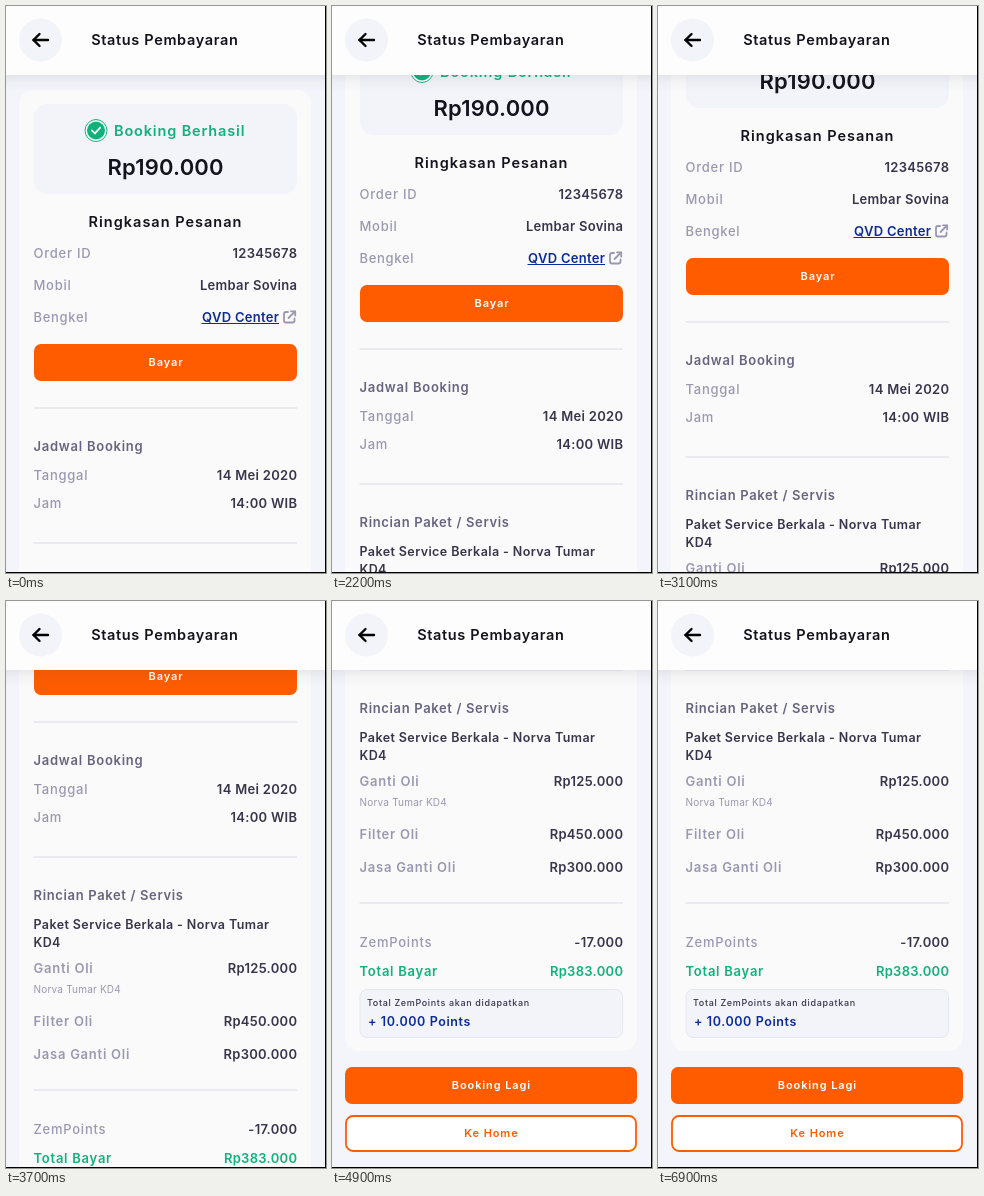
Animation, 320 px wide and 567 px high, one loop 7000 ms. Source, as an HTML page with a canvas:

```html
<!DOCTYPE html>
<html lang="id">
<head>
<meta charset="utf-8">
<title>Status Pembayaran</title>
<style>
html, body { margin: 0; width: 100%; height: 100%; overflow: hidden; background: #f4f4fb; }
canvas { display: block; width: 320px; height: 567px; }
</style>
</head>
<body>
<canvas id="stage"></canvas>
<script>
const W = 320, H = 567, LOOP = 7000, STEP = 100;
const canvas = document.getElementById('stage');
const ctx = canvas.getContext('2d');
const dpr = window.devicePixelRatio || 1;
canvas.width = W * dpr;
canvas.height = H * dpr;

const C = {
  page: '#f4f4fb', card: '#fafafa', panel: '#f3f3fa', line: '#e6e6ec',
  label: '#9a98b0', head: '#67647f', dark: '#38354b', ink: '#14131d',
  green: '#10b27c', orange: '#ff5c00', blue: '#0c2b98', white: '#ffffff'
};

const clamp = v => Math.min(1, Math.max(0, v));
const easeOut = u => 1 - (1 - u) * (1 - u);
const easeInOut = u => u * u * (3 - 2 * u);

// A short drag, then a long one to the end of the page
function scrollAt(t) {
  return Math.round(86 * easeOut(clamp((t - 1800) / 910)) +
                    382 * easeInOut(clamp((t - 3200) / 986)));
}

function box(x, y, w, h, r, fill, stroke, lw = 1) {
  ctx.beginPath();
  ctx.roundRect(x, y, w, h, r);
  if (fill) { ctx.fillStyle = fill; ctx.fill(); }
  if (stroke) { ctx.strokeStyle = stroke; ctx.lineWidth = lw; ctx.stroke(); }
}

function disc(x, y, r, fill, stroke, lw = 1) {
  box(x - r, y - r, 2 * r, 2 * r, r, fill, stroke, lw);
}

function path(points, color, lw) {
  ctx.beginPath();
  points.forEach(([x, y], i) => i ? ctx.lineTo(x, y) : ctx.moveTo(x, y));
  ctx.strokeStyle = color;
  ctx.lineWidth = lw;
  ctx.lineCap = ctx.lineJoin = 'round';
  ctx.stroke();
}

// y is the middle of the capitals
function text(str, x, y, color, { size = 13, weight = 600, gap = 0.4, align = 'left' } = {}) {
  ctx.font = `${weight} ${size}px Inter, "Open Sans", sans-serif`;
  ctx.letterSpacing = gap + 'px';
  ctx.textAlign = align;
  ctx.fillStyle = color;
  const shift = { left: 0, center: gap / 2, right: gap }[align];
  ctx.fillText(str, x + shift, y + size * 0.36);
}

function row(label, value, y, color = C.label, valueColor = C.dark, weight = 500) {
  text(label, 27.5, y, color, { weight, gap: 0.75 });
  text(value, 291, y, valueColor, { align: 'right', gap: 0.3 });
}

function rule(y) {
  ctx.fillStyle = C.line;
  ctx.fillRect(27.5, y - 0.75, 263.5, 1.5);
}

function button(str, x, y, w, outlined) {
  if (outlined) box(x + 1, y + 1, w - 2, 35, 7, C.white, C.orange, 1.8);
  else box(x, y, w, 37, 7, C.orange);
  text(str, x + w / 2, y + 18.5, outlined ? C.orange : C.white,
       { size: 11, gap: 0.9, align: 'center' });
}

function checkBadge(x, y) {
  disc(x, y, 11, C.white, C.green, 1);
  disc(x, y, 9, C.green);
  path([[x - 4, y], [x - 1.2, y + 3], [x + 4.2, y - 2.8]], C.white, 1.8);
}

function linkIcon(x, y) {
  ctx.beginPath();
  ctx.moveTo(x + 5, y + 1.5);
  ctx.lineTo(x + 3, y + 1.5);
  ctx.arcTo(x + 1, y + 1.5, x + 1, y + 4, 2);
  ctx.lineTo(x + 1, y + 10);
  ctx.arcTo(x + 1, y + 12, x + 3, y + 12, 2);
  ctx.lineTo(x + 9, y + 12);
  ctx.arcTo(x + 11.5, y + 12, x + 11.5, y + 10, 2);
  ctx.lineTo(x + 11.5, y + 8);
  ctx.strokeStyle = C.label;
  ctx.lineWidth = 1.8;
  ctx.lineCap = 'round';
  ctx.stroke();
  path([[x + 5.5, y + 7.5], [x + 12, y + 1]], C.label, 1.8);
  path([[x + 8, y + 0.8], [x + 12.2, y + 0.8], [x + 12.2, y + 5]], C.label, 1.8);
}

function summary() {
  box(28, 98, 263, 90, 14, C.panel);
  checkBadge(90, 124.5);
  text('Booking Berhasil', 108, 125, C.green, { size: 14.5, gap: 0.85 });
  text('Rp190.000', 159.5, 161, C.ink, { size: 22, gap: 0.2, align: 'center' });
  text('Ringkasan Pesanan', 159, 215.5, C.ink, { size: 14.5, gap: 1, align: 'center' });

  row('Order ID', '12345678', 247);
  row('Mobil', 'Lembar Sovina', 279);
  text('Bengkel', 27.5, 311, C.label, { weight: 500, gap: 0.7 });
  text('QVD Center', 273, 311, C.blue, { align: 'right', gap: 0.3 });
  ctx.fillStyle = C.blue;
  ctx.fillRect(195.5, 317, 77.5, 1);
  linkIcon(277, 304.5);
  button('Bayar', 28, 338, 263);
}

function details() {
  rule(402);
  text('Jadwal Booking', 27.5, 440.5, C.head, { gap: 0.75 });
  row('Tanggal', '14 Mei 2020', 469);
  row('Jam', '14:00 WIB', 497.5);

  rule(537);
  text('Rincian Paket / Servis', 27.5, 575.5, C.head, { gap: 0.65 });
  text('Paket Service Berkala - Norva Tumar', 27.5, 604, C.dark, { size: 12.5 });
  text('KD4', 27.5, 622.5, C.dark, { size: 12.5 });
  row('Ganti Oli', 'Rp125.000', 648.5, C.label, C.dark, 600);
  text('Norva Tumar KD4', 27.5, 669.5, C.label, { size: 10, weight: 400, gap: 0.2 });
  row('Filter Oli', 'Rp450.000', 701, C.label, C.dark, 600);
  row('Jasa Ganti Oli', 'Rp300.000', 734, C.label, C.dark, 600);

  rule(770);
  row('ZemPoints', '-17.000', 809.5);
  row('Total Bayar', 'Rp383.000', 838.5, C.green, C.green, 600);
  box(28, 856.5, 262.5, 48, 7, C.panel, '#e6e6f0');
  text('Total ZemPoints akan didapatkan', 35, 869.5, C.dark, { size: 9, weight: 500, gap: 0.65 });
  text('+ 10.000 Points', 36, 888.5, C.blue, { size: 12.5, gap: 0.6 });
}

function header() {
  const shade = ctx.createLinearGradient(0, 69, 0, 86);
  shade.addColorStop(0, 'rgba(40,40,60,0.08)');
  shade.addColorStop(0.4, 'rgba(40,40,60,0.03)');
  shade.addColorStop(1, 'rgba(40,40,60,0)');
  ctx.fillStyle = shade;
  ctx.fillRect(0, 69, W, 17);
  ctx.fillStyle = '#fdfdfd';
  ctx.fillRect(0, 0, W, 69);

  disc(34.5, 34, 21.5, C.panel);
  path([[42, 34], [27.5, 34]], '#000', 2.4);
  path([[33.5, 28], [27.5, 34], [33.5, 40]], '#000', 2.4);
  text('Status Pembayaran', 158.5, 34, C.ink, { size: 14.5, gap: 0.65, align: 'center' });
}

function draw(t) {
  ctx.setTransform(dpr, 0, 0, dpr, 0, 0);
  ctx.fillStyle = C.page;
  ctx.fillRect(0, 0, W, H);

  ctx.save();
  ctx.translate(0, -scrollAt(t));
  box(13, 84, 292, 834, 14, C.card);
  summary();
  details();
  button('Booking Lagi', 13, 934, 292);
  button('Ke Home', 13, 982, 292, true);
  ctx.restore();

  header();

  // Dark screen edge
  ctx.fillStyle = '#000';
  ctx.fillRect(W - 1, 0, 1, H);
  ctx.fillRect(0, H - 1, W, 1);
}

const start = performance.now();
function tick() {
  const t = (performance.now() - start) % LOOP;
  draw(Math.floor(t / STEP) * STEP);
  requestAnimationFrame(tick);
}
tick();
</script>
</body>
</html>
```
